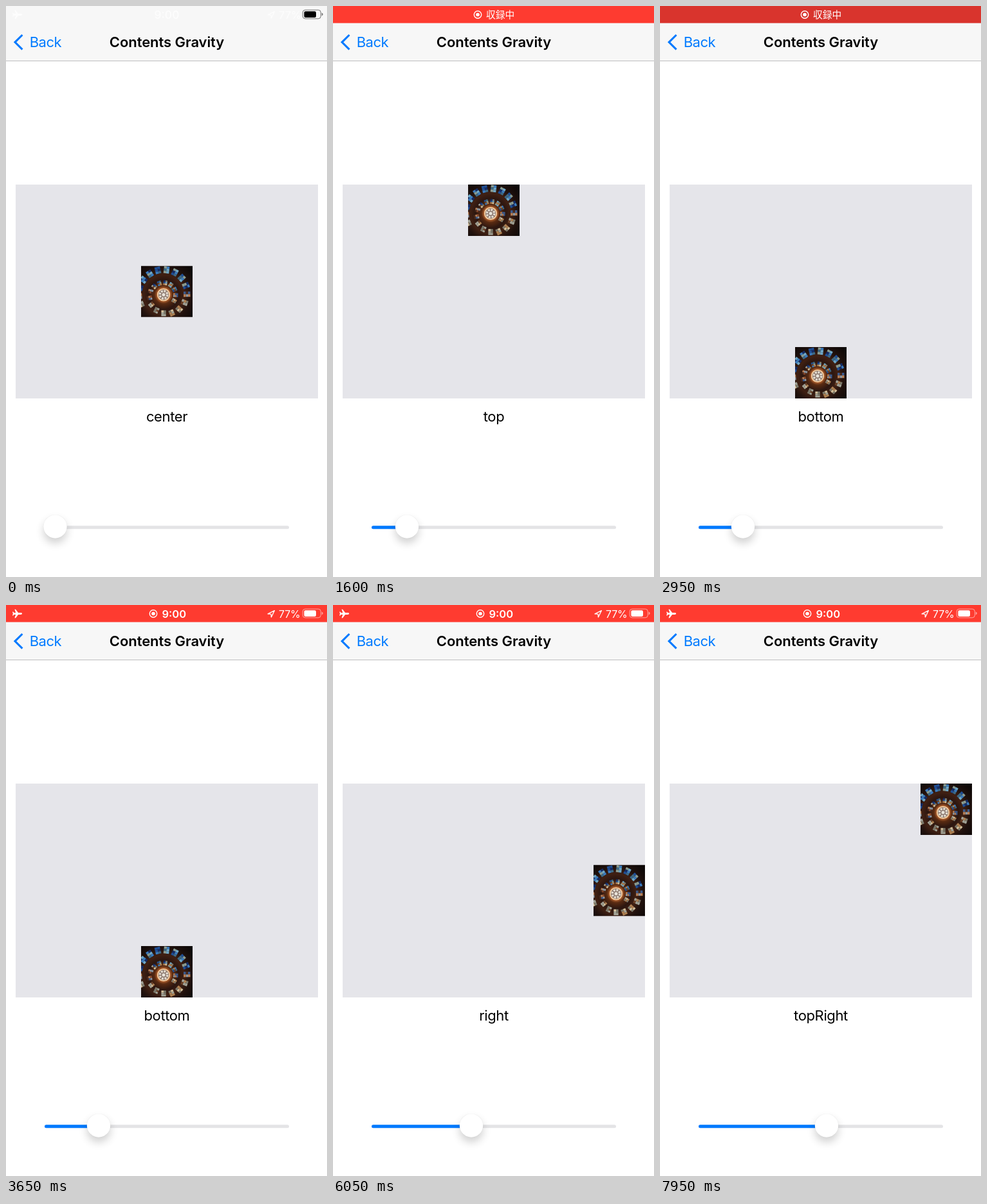
Animation, 499 px wide and 889 px high, one loop 8000 ms. Source, as an HTML page:

```html
<!DOCTYPE html>
<html lang="en">
<head>
<meta charset="utf-8">
<title>Contents Gravity</title>
<style>
  html, body { margin: 0; width: 100%; height: 100%; overflow: hidden; background: #fff; }
  svg { display: block; width: 100vw; height: 100vh; }
  text { font-family: Inter, Roboto, sans-serif; font-size: 22px; letter-spacing: -.5px; }
  .mid { text-anchor: middle; }
  .status text { font-size: 16.5px; letter-spacing: 0; }
</style>
</head>
<body>
<svg viewBox="0 0 499 889">
  <defs>
    <radialGradient id="dome" gradientUnits="userSpaceOnUse" cx="35" cy="45" r="58">
      <stop offset="0" stop-color="#e0a068"/>
      <stop offset=".17" stop-color="#b3622f"/>
      <stop offset=".24" stop-color="#5a2b12"/>
      <stop offset=".4" stop-color="#2b1610"/>
      <stop offset=".54" stop-color="#402013"/>
      <stop offset=".72" stop-color="#20110d"/>
      <stop offset="1" stop-color="#0d0807"/>
    </radialGradient>
    <filter id="soft" x="-80%" y="-80%" width="260%" height="260%">
      <feGaussianBlur stdDeviation="7"/>
    </filter>
    <clipPath id="crop"><rect width="80" height="80"/></clipPath>
    <g id="plane">
      <path d="M25 13.5c0-1-1.2-1.4-2.4-1.4h-3.6l-4-5.3h-1.6l1.8 5.3h-2.7l-1.4-1.7h-1.1l.9 3.1-.9 3.1h1.1l1.4-1.7h2.7l-1.8 5.3h1.6l4-5.3h3.6c1.2 0 2.4-.4 2.4-1.4z"/>
    </g>
    <path id="arrow" d="M407 13.8L417.4 8.6 412.4 19 412 14.2Z" fill="none" stroke-width="1.3" stroke-linejoin="round"/>
    <g id="battery">
      <rect x="461.2" y="6.2" width="28.2" height="13.6" rx="4" fill="none" stroke-opacity=".55"/>
      <rect x="463.4" y="8.2" width="18.6" height="9.7" rx="2.2" stroke="none"/>
      <path d="M490.8 10.6q2 .9 2 2.4t-2 2.4z" fill-opacity=".55" stroke="none"/>
    </g>
    <g id="rec">
      <circle r="5.7" fill="none" stroke="#fff" stroke-width="1.4"/>
      <circle r="2.8" fill="#fff"/>
    </g>
  </defs>

  <rect width="499" height="889" fill="#fff"/>
  <rect width="499" height="85" fill="#f7f7f7"/>
  <rect y="85" width="499" height="1" fill="#bdbdbf"/>

  <g class="status">
    <g id="before">
      <g fill="#fff" stroke="#fff" stroke-width="0" opacity=".75">
        <use href="#plane"/>
        <text class="mid" x="250" y="19.5" font-weight="500" style="font-size:17.5px">9:00</text>
        <use href="#arrow"/>
        <text x="424" y="19.5">77%</text>
      </g>
      <use href="#battery" fill="#000" stroke="#000"/>
    </g>
    <rect id="bar" width="499" height="26.6"/>
    <g id="recording" fill="#fff">
      <use href="#rec" x="225" y="13.5"/>
      <text x="238" y="19" style="font:300 14.7px 'Noto Sans CJK JP','Noto Sans CJK',sans-serif">収録中</text>
    </g>
    <g id="clock" fill="#fff">
      <use href="#plane"/>
      <use href="#rec" x="229" y="13.5"/>
      <text x="242.5" y="19.5" font-weight="600">9:00</text>
      <use href="#arrow" stroke="#fff"/>
      <text x="424" y="19.5" style="font-size:16px;letter-spacing:-.2px">77%</text>
      <use href="#battery" stroke="#fff"/>
    </g>
  </g>

  <path d="M25.4 45L14 56.3 25.4 67.6" fill="none" stroke="#007aff" stroke-width="3.1"/>
  <text x="36.7" y="64" fill="#007aff">Back</text>
  <text class="mid" x="250" y="64" font-weight="600" style="letter-spacing:-.07px">Contents Gravity</text>

  <rect x="15" y="278" width="470" height="333" fill="#e5e5ea"/>
  <g id="photo" clip-path="url(#crop)"><rect width="80" height="80" fill="url(#dome)"/></g>
  <text id="label" class="mid" x="250" y="647" style="letter-spacing:-.38px"></text>

  <rect x="60" y="809.2" width="380" height="5" rx="2.5" fill="#e4e4e6"/>
  <rect id="fill" x="60" y="809.2" height="5" rx="2.5" fill="#007aff"/>
  <g id="knob">
    <circle cy="818" r="18" fill="#000" opacity=".19" filter="url(#soft)"/>
    <circle cy="810.5" r="18.6" fill="#000" opacity=".05"/>
    <circle cy="810.5" r="18.2" fill="#fff"/>
  </g>
</svg>

<script>
const LOOP = 8000;
const $ = id => document.getElementById(id);
const clamp = (v, a = 0, b = 1) => Math.min(b, Math.max(a, v));
const smooth = u => u * u * (3 - 2 * u);
const ramp = (t, a, b) => smooth(clamp((t - a) / (b - a)));

// name, horizontal and vertical alignment within the panel
const gravities = [
  ['center', .5, .5], ['top', .5, 0], ['bottom', .5, 1], ['left', 0, .5],
  ['right', 1, .5], ['topLeft', 0, 0], ['topRight', 1, 0]
];

// time, knob centre
const drag = [
  [0, 76.5], [1250, 76.5], [1420, 97], [1600, 115], [2100, 119], [2900, 127],
  [2950, 129], [3650, 144], [4350, 159], [5050, 167], [5450, 181], [5650, 191],
  [6050, 215], [6400, 222], [7100, 252.5], [7500, 257.5], [7950, 259], [8000, 259]
];

function knobAt(t) {
  const i = Math.max(1, drag.findIndex(k => k[0] >= t));
  const [t0, x0] = drag[i - 1], [t1, x1] = drag[i];
  return x0 + (x1 - x0) * clamp((t - t0) / (t1 - t0));
}

let seed = 11;
const rnd = () => (seed = seed * 16807 % 2147483647) / 2147483647;
const pick = list => list[Math.floor(rnd() * list.length)];

// A spiral of coloured windows around a bright rosette
function drawDome() {
  const blue = ['#1f4f96', '#3a7cc0', '#6fa9c8', '#142c66', '#3d6a86', '#8a9c92'];
  const warm = ['#b08253', '#d3c09c', '#7d7a6c', '#6b4128', '#a3a498'];
  const rust = ['#8d4c2e', '#b98056', '#3c5c90', '#8c9aa6', '#4a2a1e'];
  let out = '';
  for (let s = 0; s < 600;) {
    const u = ramp(s, 130, 470), r = 18.8 + 20.2 * u, a = 30 - s;
    const w = 6 + 2.6 * u, h = 7.4 + 3.4 * u;
    const up = -Math.sin(a * Math.PI / 180);
    const tones = up > .25 ? (u > .5 ? blue : blue.concat(warm)) : up < -.3 ? warm : rust;
    out += `<g transform="translate(35 45) rotate(${a + 90}) translate(0 ${-r})">`;
    for (let j = 0; j < 3; j++)
      for (let i = 0; i < 2; i++)
        out += `<rect x="${(i - 1) * w / 2}" y="${(j - 1.5) * h / 3}" width="${w / 2}" height="${h / 3}" fill="${pick(tones)}"/>`;
    out += '</g>';
    s += 28 - 8 * u;
  }
  const ring = (r, color, width, dash) =>
    `<circle cx="35" cy="45" r="${r}" fill="none" stroke="${color}" stroke-width="${width}" stroke-dasharray="${dash}"/>`;
  out += '<circle cx="35" cy="45" r="8.6" fill="#8d7a70"/>' +
    ring(9.2, '#f3cfa4', 1.8, 'none') + ring(5.8, '#e3ddd2', 3.4, '2.9 1.6') +
    '<circle cx="35" cy="45" r="2.5" fill="#e9e4da"/>';
  $('photo').insertAdjacentHTML('beforeend', out);
}

function render(t) {
  const x = knobAt(t);
  const index = clamp(Math.floor((x - 66) / 31), 0, gravities.length - 1);
  const [name, gx, gy] = gravities[index];
  $('photo').setAttribute('transform', `translate(${15 + 390 * gx} ${278 + 253 * gy})`);
  if ($('label').textContent !== name) $('label').textContent = name;
  $('knob').setAttribute('transform', `translate(${x} 0)`);
  $('fill').setAttribute('width', x - 60);
  $('fill').setAttribute('opacity', x > 77 ? 1 : 0);

  const red = ramp(t, 20, 400), back = ramp(t, 3000, 3350);
  const pulse = clamp(.54 + .54 * Math.cos((t - 1800) / 2050 * 2 * Math.PI));
  const mix = (a, b) => Math.round(a + (b - a) * pulse);
  $('bar').setAttribute('fill', `rgb(${mix(215, 255)},${mix(52, 59)},${mix(45, 48)})`);
  $('bar').setAttribute('opacity', red);
  $('before').setAttribute('opacity', 1 - red);
  $('recording').setAttribute('opacity', red * (1 - back));
  $('clock').setAttribute('opacity', back);
}

drawDome();
const start = performance.now();
function tick() {
  render((performance.now() - start) % LOOP);
  requestAnimationFrame(tick);
}
tick();
</script>
</body>
</html>
```
